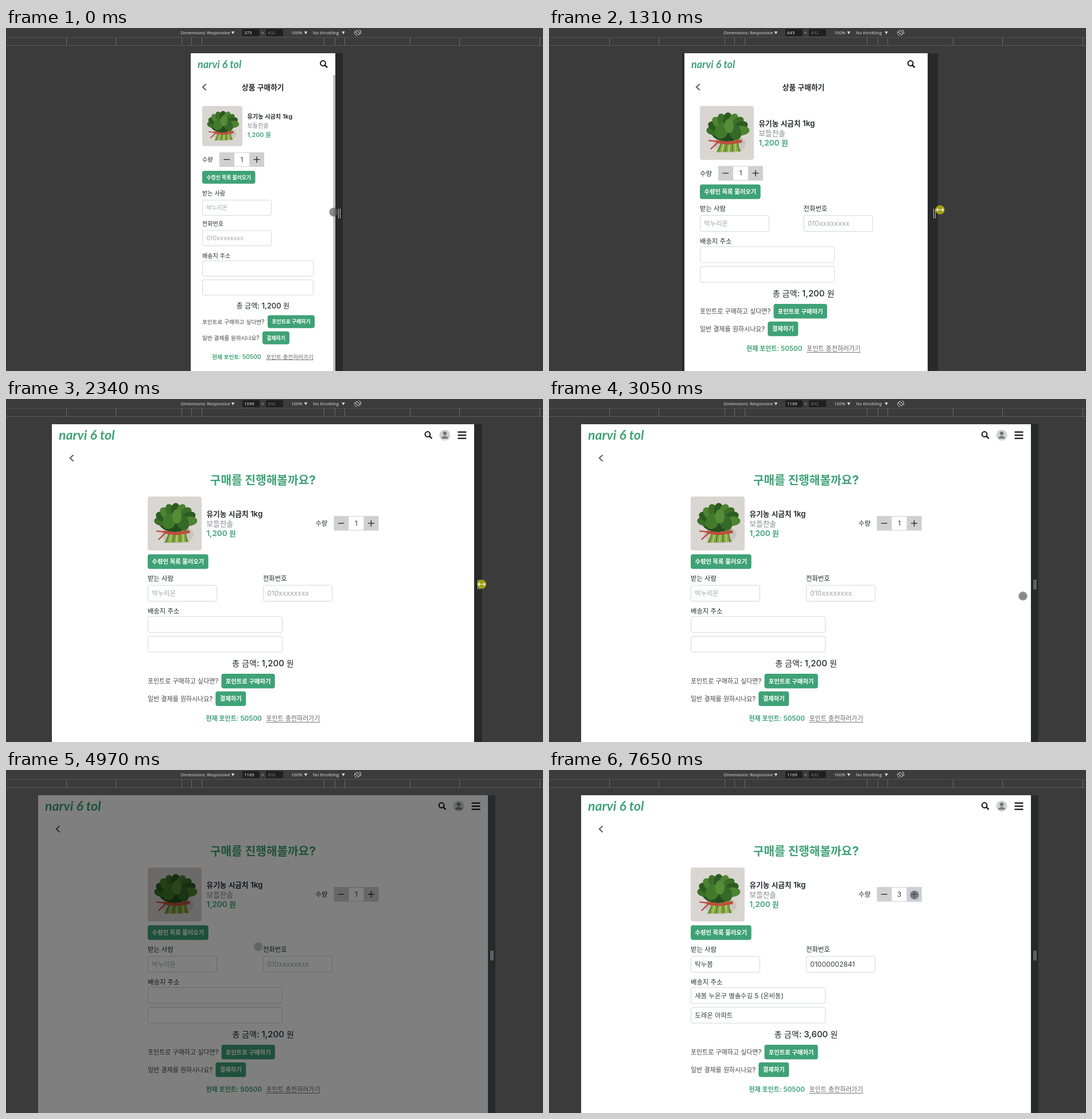
These frames come from a looping animation (936 px wide and 598 px high, 8000 ms). An HTML page with a canvas:

```html
<!DOCTYPE html>
<html lang="ko">
<head>
<meta charset="utf-8">
<title>Responsive checkout</title>
<style>
html, body { margin: 0; width: 100%; height: 100%; overflow: hidden; background: #3b3b3b; }
canvas { display: block; width: 936px; height: 598px; }
</style>
</head>
<body>
<canvas id="stage" width="936" height="598"></canvas>
<script>
const c = document.getElementById('stage').getContext('2d');
const LOOP = 8000, SCALE = 0.6707, MID = 448.2, TOP = 44;
const GREEN = '#3fa276', INK = '#24292e', GRAY = '#868a8e';

// keyframes: [time, value, ...]
const FRAME_W = [[960, 375], [1310, 645], [1780, 859], [1920, 945], [2340, 1099],
  [2620, 1154], [2820, 1181], [2950, 1169]];
const PAGE_W = [[990, 375], [1310, 632], [1780, 790], [1920, 837], [2100, 1010],
  [2340, 1097], [2650, 1154], [2860, 1181], [2990, 1169]];
const POINTER = [[60, 571, 321], [430, 583.5, 316], [960, 583.5, 316], [1310, 681.5, 317],
  [1780, 746, 320], [1920, 781, 321], [2340, 829, 323], [2620, 844, 324], [2820, 850, 324],
  [2950, 847, 324], [3010, 847, 324], [3190, 755, 410], [3310, 755, 410], [3860, 329, 286],
  [4060, 329, 283], [4160, 329, 283], [4360, 466, 296], [4620, 466, 296], [5030, 435, 310],
  [5230, 435, 310], [5440, 440, 316], [5510, 440, 316], [5780, 490, 408], [5990, 649, 447],
  [6240, 649, 447], [6600, 618, 265], [6780, 637, 218]];
const PRESSED = [[690, 2950], [4060, 4120], [6980, 7050], [7510, 7650]];
const DIM = [[4170, 0], [4340, 0.5], [5230, 0.5], [5430, 0]];

function at(keys, t, i = 1) {
  if (t <= keys[0][0]) return keys[0][i];
  for (let n = 1; n < keys.length; n++) {
    const a = keys[n - 1], b = keys[n];
    if (t <= b[0]) return a[i] + (b[i] - a[i]) * (t - a[0]) / (b[0] - a[0]);
  }
  return keys[keys.length - 1][i];
}

function rect(x, y, w, h, color) {
  c.fillStyle = color;
  c.fillRect(x, y, w, h);
}

function round(x, y, w, h, r, fill, stroke) {
  c.beginPath();
  c.roundRect(x, y, w, h, r);
  if (fill) { c.fillStyle = fill; c.fill(); }
  if (stroke) { c.strokeStyle = stroke; c.lineWidth = 1; c.stroke(); }
}

function oval(x, y, rx, ry, color, turn = 0) {
  c.beginPath();
  c.ellipse(x, y, rx, ry, turn, 0, Math.PI * 2);
  c.fillStyle = color;
  c.fill();
}

function lines(color, width, ...paths) {
  c.strokeStyle = color;
  c.lineWidth = width;
  c.beginPath();
  for (const p of paths)
    for (let i = 0; i < p.length; i += 2) i ? c.lineTo(p[i], p[i + 1]) : c.moveTo(p[0], p[1]);
  c.stroke();
}

// Hangul is set slightly smaller than the Latin letters beside it.
function text(str, x, y, size, weight, color, centered) {
  const runs = str.match(/[가-힣]+|[^가-힣]+/g).map(s => {
    const ko = s[0] >= '가' && s[0] <= '힣';
    const font = ko ? `${weight} ${size * 0.94}px "Noto Sans CJK KR", "Noto Sans CJK", sans-serif`
      : `${weight} ${size}px Inter, sans-serif`;
    c.font = font;
    return { s, font, w: c.measureText(s).width };
  });
  const width = runs.reduce((sum, r) => sum + r.w, 0);
  let pen = centered ? x - width / 2 : x;
  c.fillStyle = color;
  for (const r of runs) {
    c.font = r.font;
    c.fillText(r.s, pen, y + size * 0.36);
    pen += r.w;
  }
  return width;
}

function ui(str, x, color, size = 7.6) {
  c.font = `${size}px "Open Sans", "Noto Sans", sans-serif`;
  c.fillStyle = color;
  c.fillText(str, x, 11.3);
}

function arrowDown(x) {
  c.fillStyle = '#d8d8d8';
  c.beginPath();
  c.moveTo(x - 2.8, 6);
  c.lineTo(x + 2.8, 6);
  c.lineTo(x, 11);
  c.fill();
}

function toolbar(width) {
  rect(0, 0, 936, 598, '#3b3b3b');
  rect(0, 0, 936, 16, '#3c3c3c');
  rect(0, 16, 936, 1, '#515151');
  rect(0, 30, 936, 1, '#5b5b5b');
  for (const x of [105, 191, 306, 323, 341, 554, 573, 590, 704, 790, 930]) rect(x, 17, 1, 13, '#6a6a6a');
  ui('Dimensions: Responsive', 304.5, '#dedede');
  arrowDown(395.5);
  round(412, 2, 30, 12, 1, '#1f1f1f');
  round(453, 2, 30, 12, 1, '#1f1f1f');
  ui(String(Math.round(width)), 415, '#f0f0f0', 7.8);
  ui('×', 445, '#bdbdbd', 8);
  ui('832', 456.5, '#7d7d7d', 7.8);
  ui('100%', 497, '#dedede');
  arrowDown(522.5);
  ui('No throttling', 535, '#dedede');
  arrowDown(588);
  c.save();
  c.translate(613, 8);
  c.rotate(-Math.PI / 4);
  round(-2, -4, 4, 8, 0.8, null, '#d0d0d0');
  c.beginPath();
  c.arc(0, 0, 5.6, -0.3, 1.2);
  c.moveTo(-5.3, 0.9);
  c.arc(0, 0, 5.6, 2.85, 4.3);
  c.stroke();
  c.restore();
}

function spinach(x, y, s) {
  c.save();
  round(x, y, s, s, 4, '#d9d6d2');
  c.clip();
  c.translate(x, y);
  c.scale(s, s);
  oval(0.55, 0.7, 0.3, 0.17, '#c8c4be');
  c.fillStyle = '#86a844';
  c.beginPath();
  c.moveTo(0.32, 0.55);
  c.lineTo(0.76, 0.55);
  c.lineTo(0.7, 0.72);
  c.lineTo(0.77, 0.84);
  c.lineTo(0.3, 0.86);
  c.lineTo(0.39, 0.7);
  c.fill();
  for (let i = 0; i < 7; i++)
    lines(i % 2 ? '#c2d183' : '#55792c', 0.018, [0.42 + i * 0.045, 0.6, 0.34 + i * 0.065, 0.85]);
  oval(0.5, 0.46, 0.3, 0.2, '#244d1d');
  for (let i = 0; i < 9; i++) {
    const a = Math.PI * (1.02 + i * 0.12);
    oval(0.52 + Math.cos(a) * 0.25, 0.47 + Math.sin(a) * 0.2, 0.15, 0.09,
      ['#3c6f28', '#2c5a20', '#4d8432'][i % 3], a);
  }
  oval(0.4, 0.46, 0.12, 0.15, '#427a2c', 0.4);
  oval(0.65, 0.48, 0.11, 0.15, '#35692a', -0.4);
  oval(0.54, 0.37, 0.09, 0.13, '#568c38');
  lines('#bd4e3c', 0.055, [0.3, 0.66, 0.52, 0.69, 0.78, 0.65]);
  lines('#bd4e3c', 0.025, [0.34, 0.66, 0.16, 0.64], [0.34, 0.67, 0.2, 0.8]);
  c.restore();
}

function button(str, x, y, w, h, size) {
  round(x, y, w, h, 4, GREEN);
  text(str, x + w / 2, y + h / 2, size, 700, '#fff', true);
}

function field(x, y, w, h, value, hint, size) {
  round(x + 0.5, y + 0.5, w - 1, h - 1, 3, '#fff', '#d3d6d9');
  if (value || hint) text(value || hint, x + 7.3, y + h / 2, size, 400, value ? '#3a3f44' : '#a3a8a8');
}

function counter(x, y, n, hover) {
  rect(x, y, 78, 25.5, '#d0d0d0');
  rect(x + 26, y + 1, 26, 23.5, '#fff');
  if (hover) rect(x + 52, y, 26, 25.5, '#cbcfd8');
  const my = y + 12.7;
  lines('#222', 1.3, [x + 7.5, my, x + 18, my], [x + 59.5, my, x + 70.5, my], [x + 65, my - 5.5, x + 65, my + 5.5]);
  text(String(n), x + 39, my, 11.5, 400, '#333', true);
}

function header(left, right, wide) {
  c.font = `italic 700 ${wide ? 23 : 18}px Lato, sans-serif`;
  c.fillStyle = GREEN;
  c.fillText('narvi 6 tol', left + 12, wide ? 71 : 69.5);
  const sx = right - (wide ? 79.5 : 19.5);
  c.strokeStyle = '#111';
  c.lineWidth = 2;
  c.beginPath();
  c.arc(sx - 1.5, 61.5, 4.4, 0, 7);
  c.stroke();
  lines('#111', 2.4, [sx + 1.6, 64.6, sx + 6, 69]);
  if (wide) {
    const ax = right - 51;
    oval(ax, 63, 9.5, 9.5, '#d0d1d1');
    oval(ax, 60, 3.3, 3.3, '#77797a');
    c.beginPath();
    c.ellipse(ax, 69, 6, 4.4, 0, Math.PI, 0);
    c.fill();
    for (const y of [56.5, 62, 67.5]) rect(right - 28.5, y, 15, 2.2, '#111');
  }
  const bx = left + (wide ? 34.5 : 23.8);
  lines('#666', 2.2, [bx + 3, 97.5, bx - 2.8, 103, bx + 3, 108.5]);
}

function page(t) {
  const css = at(PAGE_W, t), w = css * SCALE;
  const left = Math.round(MID - w / 2);
  const lag = t > 1000 && t < 1780 ? 9 : 0;
  const lay = w - lag, right = left + lay, mid = left + lay / 2;
  const mobile = css < 576, wide = css >= 768, desk = css >= 1024;
  rect(left, TOP, Math.round(w), 554, '#fff');
  c.save();
  c.beginPath();
  c.rect(left, TOP, Math.round(w), 554);
  c.clip();
  header(left, right, wide);
  if (desk) text('구매를 진행해볼까요?', mid, 141, 21.5, 700, GREEN, true);
  else text('상품 구매하기', mid, 103, 13.5, 600, INK, true);

  const x = mobile ? left + 20 : mid - Math.min(402, lay - 54) / 2;
  const dy = desk ? 34 : 0;
  const full = t >= 5230;
  const count = t >= 7650 ? 3 : t >= 7050 ? 2 : 1;
  const small = mobile ? 10.73 : 12.07;
  const note = mobile ? 10.25 : 11.66;
  const bold = mobile ? 9.4 : 11;

  // product
  const pic = mobile ? 70 : 94, tx = x + pic + 8.5, size = mobile ? 10.8 : 13.45;
  spinach(x, 136 + dy, pic);
  const rows = mobile ? [154, 170, 186] : [166, 183, 200.5];
  text('유기농 시금치 1kg', tx, rows[0] + dy, size, 600, INK);
  text('보들찬솔', tx, rows[1] + dy, size, 400, GRAY);
  text('1,200 원', tx, rows[2] + dy, size, 600, GREEN);

  // quantity
  const qy = wide ? 170 + dy : mobile ? 216.7 : 240.5;
  text('수량', wide ? x + 292.5 : x, qy + 12.8, small, 500, INK);
  counter(wide ? x + 324.5 : x + (mobile ? 30 : 32), qy, count, t >= 6740);

  // form
  const oy = wide ? dy : 36;
  const Y = mobile
    ? { load: 249, who: 288, f1: 299.5, tel: 341, f2: 352.5, addr: 397, a1: 405.5, a2: 438.5,
        sum: 484, r1: 512, r2: 540.3, pts: 573 }
    : { load: 236.8 + oy, who: 279 + oy, f1: 290.3 + oy, tel: 279 + oy, f2: 290.3 + oy, addr: 336 + oy,
        a1: 344.8 + oy, a2: 379 + oy, sum: 426.5 + oy, r1: 457.7 + oy, r2: 488.5 + oy, pts: 523 + oy };
  const bh = mobile ? 22.6 : 25.4, fh = mobile ? 27.7 : 28.8, aw = mobile ? 194 : 235;
  button('수령인 목록 불러오기', x, Y.load, mobile ? 92.5 : 105.7, bh, bold);
  const x2 = mobile ? x : mid;
  text('받는 사람', x, Y.who, small, 500, INK);
  field(x, Y.f1, 121, fh, full && '탁누봄', '박누리온', small);
  text('전화번호', x2, Y.tel, small, 500, INK);
  field(x2, Y.f2, 121, fh, full && '01000002841', '010xxxxxxxx', small);
  text('배송지 주소', x, Y.addr, small, 500, INK);
  field(x, Y.a1, aw, fh, full && '새봄 누온구 별솔수길 5 (온비동)', '', small);
  field(x, Y.a2, aw, fh, full && '도레온 아파트', '', small);

  // payment
  const price = (count * 1200).toLocaleString('en-US');
  text(`총 금액: ${price} 원`, mid, Y.sum, mobile ? 12.9 : 15, 500, INK, true);
  text('포인트로 구매하고 싶다면?', x, Y.r1, note, 400, '#444');
  button('포인트로 구매하기', x + (mobile ? 114 : 128.5), Y.r1 - bh / 2, mobile ? 82 : 93.3, bh, bold);
  text('일반 결제를 원하시나요?', x, Y.r2, note, 400, '#444');
  button('결제하기', x + (mobile ? 105 : 118.3), Y.r2 - bh / 2, mobile ? 47 : 53, bh, bold);
  text('현재 포인트: 50500', mid - (mobile ? 88.5 : 99.5), Y.pts, note, 600, GREEN);
  const lw = text('포인트 충전하러가기', mid + 5.5, Y.pts, note, 400, '#666');
  rect(mid + 5.5, Math.round(Y.pts + note * 0.48), lw, 1, '#777');

  if (mobile && t < 1020) rect(left + w - 3, 82, 3, 516, '#b5b5b5');
  const dim = at(DIM, t);
  if (dim > 0) rect(left, TOP, w, 554, `rgba(0,0,0,${dim})`);
  c.restore();
}

function pointer(t) {
  const x = at(POINTER, t), y = at(POINTER, t, 2);
  const down = PRESSED.some(([a, b]) => t >= a && t < b);
  oval(x, y, 8, 8, down ? 'rgba(182,182,12,.82)' : 'rgba(90,90,90,.42)');
  if (!down) oval(x, y, 7, 7, 'rgba(90,90,90,.5)');
  if (t > 250 && t < 3010)
    lines('#fff', 1.1, [x - 6, y, x + 6, y], [x - 3.5, y - 2.5, x - 6, y, x - 3.5, y + 2.5],
      [x + 3.5, y - 2.5, x + 6, y, x + 3.5, y + 2.5]);
}

function draw(t) {
  const width = at(FRAME_W, t), w = width * SCALE;
  toolbar(width);
  const left = Math.round(MID - w / 2), right = Math.round(MID + w / 2 + 13);
  rect(left, TOP, right - left, 554, '#28292a');
  page(t);
  rect(right - 8, 315, 1, 17, '#c4c4c4');
  rect(right - 5, 315, 1, 17, '#c4c4c4');
  pointer(t);
}

const start = performance.now();
function tick() {
  draw((performance.now() - start) % LOOP);
  requestAnimationFrame(tick);
}
tick();
</script>
</body>
</html>
```
